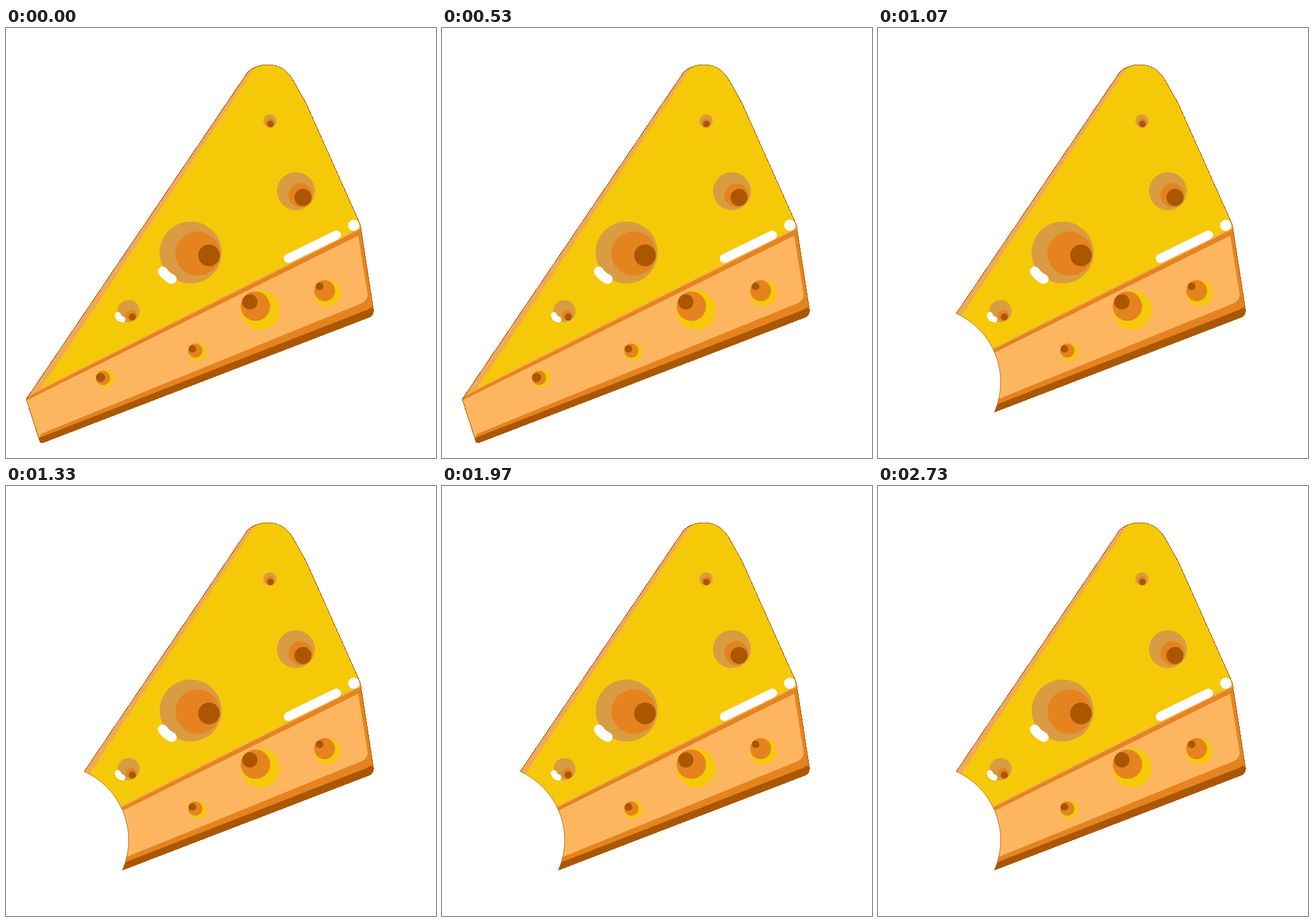
These frames come from a looping animation (680x680 px, 2.76 s). An HTML page:

```html
<!DOCTYPE html>
<html lang="en">
<head>
<meta charset="utf-8">
<title>Cheese</title>
<style>
  html, body { margin: 0; width: 100%; height: 100%; overflow: hidden; background: #fff; }
  svg { display: block; width: 100vw; height: 100vh; }
</style>
</head>
<body>
<svg viewBox="0 0 680 680">
  <defs>
    <path id="outline" d="M32 587 L382 70 C392 61 402 58 414 58 C434 58 446 68 455 84 L475 120 L559 308 L561 315 L581 445 Q582 454 574 457.500 L59 655.500 Q54 657 53 652 Z"/>
    <clipPath id="inside"><use href="#outline"/></clipPath>
  </defs>
  <g clip-path="url(#inside)">
    <rect width="680" height="680" fill="#e5841e"/>
    <path fill="#f0a958" d="M30 587 L382 65 H400 L52 574 L33 584 Z"/>
    <path fill="#f5c908" stroke="#f0a958" stroke-width="2" d="M52 573 L389 68 L400 50 H480 L580 290 V307 Z"/>
    <path fill="#fdb55f" d="M30 590 L557 328.500 L572 422 Q571 431 563 435 L55 642 L50 655 Z"/>
    <path fill="#ab5700" d="M50 649 L573 445 Q575 441 579 443 L590 448 V465 L50 670 Z"/>
  </g>
  <use href="#outline" fill="none" stroke="#ab5700" shape-rendering="crispEdges"/>
  <g id="holes"></g>
  <g fill="none" stroke="#fff" stroke-linecap="round">
    <path stroke-width="14.500" d="M446.500 364.500 L522.500 327.500"/>
    <path stroke-width="15.500" d="M248 385 Q253 393 262 397"/>
    <path stroke-width="9.500" d="M177 454 Q178 460 184 461"/>
    <path stroke-width="18" d="M550 312 h.01"/>
  </g>
  <g id="bite" visibility="hidden">
    <circle cx="75" cy="560" r="119" fill="#fff"/>
    <circle cx="75" cy="560" r="119" fill="none" stroke="#ab5700" stroke-width=".8" clip-path="url(#inside)"/>
  </g>
</svg>
<script>
  const LOOP = 2760, BITE_AT = LOOP / 3;
  // reach: how far towards the rim the inner discs are pushed
  const TOP = { rim: "#da9c42", reach: 0.95 };
  const SIDE = { rim: "#f5c908", reach: 1.06 };

  const disc = (x, y, r, fill) => `<circle cx="${x}" cy="${y}" r="${r}" fill="${fill}"/>`;

  // Nested discs leaning in one direction; middle and core are shares of the radius.
  function hole(face, x, y, r, degrees, middle, core) {
    const angle = degrees * Math.PI / 180;
    const inner = (share, fill) => {
      const shift = r * (face.reach - share);
      return disc(x + shift * Math.cos(angle), y + shift * Math.sin(angle), r * share, fill);
    };
    return disc(x, y, r, face.rim) + inner(middle, "#e5841e") + inner(core, "#ab5700");
  }

  document.getElementById("holes").innerHTML =
    hole(TOP, 292, 355, 49, 9, 0.72, 0.35) +
    hole(TOP, 458.5, 258, 30, 42, 0.63, 0.45) +
    hole(TOP, 417.5, 147, 10.5, 82, 0.66, 0.5) +
    hole(TOP, 193.7, 447.7, 17.5, 57, 0.49, 0.32) +
    hole(SIDE, 402, 446, 31, 218, 0.75, 0.39) +
    hole(SIDE, 508, 419, 20.8, 221, 0.8, 0.29) +
    hole(SIDE, 302.5, 512, 14, 210, 0.8, 0.43) +
    hole(SIDE, 157, 554, 14, 190, 0.8, 0.52);

  const bite = document.getElementById("bite");
  const start = performance.now();

  function draw(now) {
    const t = Math.max(0, now - start) % LOOP;
    bite.setAttribute("visibility", t >= BITE_AT ? "visible" : "hidden");
    requestAnimationFrame(draw);
  }
  draw(start);
</script>
</body>
</html>
```
